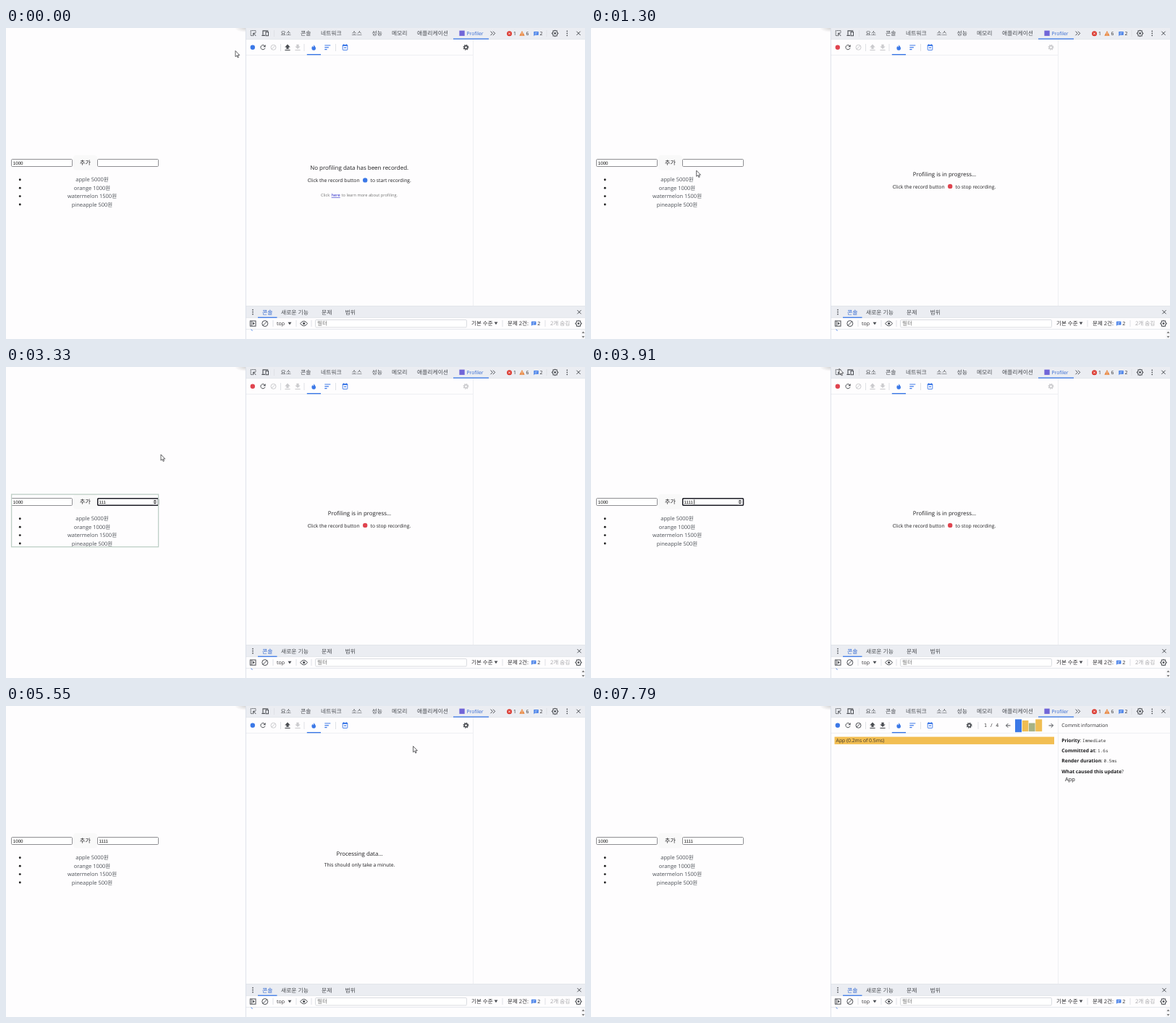
Write an HTML page that moves like this. It is 800 px wide and 430 px high and loops after 7.82 s.

```html
<!DOCTYPE html>
<html lang="ko">
<head>
<meta charset="utf-8">
<title>Profiler recording</title>
<style>
  html, body { margin: 0; width: 100%; height: 100%; overflow: hidden; background: #fefdfe; }
  svg { display: block; width: 800px; height: 430px; font-family: "Open Sans", "Noto Sans CJK KR", "Noto Sans CJK", sans-serif; }
  text { text-rendering: geometricPrecision; }
  .mono { font-family: "Noto Sans Mono", monospace; }
  .field { font-family: "Liberation Sans", sans-serif; }
</style>
</head>
<body>
<svg id="stage" viewBox="0 0 800 430" xmlns="http://www.w3.org/2000/svg"></svg>
<script>
const LOOP = 7820;
const BLUE = '#3b78e7', RED = '#e0444f', DARK = '#4a4d52', PALE = '#cbcbce';
const BAR = '#ebedf2', RULE = '#eeeff3';
const CLICK_START = 700, FOCUS = 1970, CLICK_STOP = 4880, RESULTS = 5690;
const KEYS = [2390, 2560, 2800, 3430];
const HIGHLIGHT_END = 3700;
const HIGHLIGHT_COLORS = ['#a9cfcb', '#b6cec8', '#becfc6', '#c6d0c0'];

const text = (x, y, str, size, fill = '#2b2b2e', attrs = '') =>
  `<text x="${x}" y="${y}" font-size="${size}" fill="${fill}" ${attrs}>${str}</text>`;
const middle = (x, y, str, size, fill = '#1c1c1e') => text(x, y, str, size, fill, 'text-anchor="middle"');
const rect = (x, y, w, h, fill, attrs = '') =>
  `<rect x="${x}" y="${y}" width="${w}" height="${h}" fill="${fill}" ${attrs}/>`;
const line = (d, color, width = 1, attrs = '') =>
  `<path d="${d}" fill="none" stroke="${color}" stroke-width="${width}" ${attrs}/>`;
const fill = (d, color) => `<path d="${d}" fill="${color}"/>`;
const dot = (x, y, r, color, attrs = '') => `<circle cx="${x}" cy="${y}" r="${r}" fill="${color}" ${attrs}/>`;
const group = (id, body) => `<g id="${id}">${body}</g>`;

// Icons
const gear = (x, y, color) =>
  dot(x, y, 2.2, 'none', `stroke="${color}" stroke-width="1.7"`) +
  dot(x, y, 3.4, 'none', `stroke="${color}" stroke-width="1.2" stroke-dasharray="${3.4 * Math.PI / 8}"`);
const hexGear = (x, y) =>
  line(`M${x - 4.2} ${y}l1.4 -1.5l.3 -2.1h2.1l.4 -.5l.4 .5h2.1l.3 2.1l1.4 1.5l-1.4 1.5l-.3 2.1h-2.1l-.4 .5l-.4 -.5h-2.1l-.3 -2.1z`, DARK, 1.1) +
  dot(x, y, 1.4, DARK);
const ban = (x, y, color, r = 3.5) =>
  dot(x, y, r, 'none', `stroke="${color}"`) + line(`M${x - r * .7} ${y + r * .7}l${r * 1.4} ${-r * 1.4}`, color);
const cross = (x, y) => line(`M${x - 2.6} ${y - 2.6}l5.2 5.2m0 -5.2l-5.2 5.2`, DARK, 1);
const kebab = (x, y) => [-3, 0, 3].map(d => dot(x, y + d, .85, DARK)).join('');
const load = (x, up, color) =>
  fill(up ? `M${x} 22.6l3.7 3.9h-2.1v2.4h-3.2v-2.4h-2.1z` : `M${x} 28.9l-3.7-3.5h2.1v-2.6h3.2v2.6h2.1z`, color) +
  rect(x - 3.6, 30, 7.2, 1.1, color);
const bubble = (x, y) => fill(`M${x} ${y}h6.4v4.8h-5l-1.4 1.4z`, BLUE) +
  line(`M${x + 1.2} ${y + 1.6}h4m-4 1.6h2.8`, '#fff', .6);
const separator = (x, y, h) => line(`M${x} ${y}v${h}`, '#dfe1e6', 1);
const arrow = (x, dir, color) => line(`M${x - 3 * dir} 27h${6 * dir}m${-2.8 * dir} -2.8l${2.8 * dir} 2.8l${-2.8 * dir} 2.8`, color, 1);
const inputBox = x => rect(x, 181.5, 84, 10, '#fff', 'rx="1.2" stroke="#8e8e92"');
const fieldText = (str, x, attrs = '') => text(x, 188.8, str, 6.2, '#111', `class="field" ${attrs}`);

function page() {
  const items = ['apple 5000원', 'orange 1000원', 'watermelon 1500원', 'pineapple 500원'];
  return `<defs><radialGradient id="shade"><stop offset="0" stop-color="#999" stop-opacity=".4"/><stop offset="1" stop-color="#999" stop-opacity="0"/></radialGradient></defs>` +
    rect(0, 0, 800, 430, '#fefdfe') +
    `<ellipse cx="331" cy="0" rx="15" ry="6" fill="url(#shade)"/>` +
    rect(93, 176, 33, 20.5, '#f9f9f9', 'rx="4"') + middle(109.4, 189, '추가', 8) +
    inputBox(7.5) + fieldText('1000', 9.8) + inputBox(126.5) +
    group('focus',
      rect(126.7, 181.7, 83.8, 9.6, '#fff', 'rx="1.2" stroke="#1b1b24" stroke-width="1.5"')) +
    group('spinner', rect(202.5, 183, 6.5, 7.2, '#ededef') +
      fill('M203.7 186l2.1-2.3l2.1 2.3zM203.7 187.3l2.1 2.3l2.1-2.3z', '#444')) +
    fieldText('', 128.6, 'id="typed"') +
    rect(0, 183.4, .8, 6.4, '#222', 'id="caret"') +
    items.map((s, i) => dot(19.3, 209.8 + i * 11.4, 1.45, '#222') +
      middle(119, 212.3 + i * 11.4, s, 7.5, '#4c5157')).join('') +
    rect(7.6, 176.1, 203, 72.6, 'none', 'id="highlight" stroke-width="1.3"');
}

function topTabs() {
  const tabs = [[379.5, '요소'], [407, '콘솔'], [435, '네트워크'], [477.5, '소스'], [505.5, '성능'], [533, '메모리'], [568, '애플리케이션']];
  return rect(331, 0, 469, 430, '#fefdfe') + rect(331, 0, 469, 15.5, BAR) +
    line('M331 15.6H800', '#dde1e9', .7) +
    line('M342 10.6h-3.8v-7h6.8v3', DARK, 1, 'stroke-dasharray="1.4 .7"') +
    line('M345.3 11l-3.6-3.8m0 3v-3h3', DARK, 1) +
    line('M355 9.5v-5.6h7.3M353.4 10.4h4.5', DARK, 1.1) + rect(359, 5.5, 3.5, 5.2, 'none', `stroke="${DARK}"`) +
    separator(370.5, 3, 9) +
    tabs.map(([x, s]) => text(x, 9.9, s, 7.8, '#484b50')).join('') +
    rect(626.4, 3.6, 7.3, 7.3, '#7065d8') +
    text(636.5, 9.7, 'Profiler', 6.75, '#2f66d0') + rect(618, 14.4, 49, 1.3, BLUE) +
    line('M669.5 4.6l2.8 2.8l-2.8 2.8m3.4-5.6l2.8 2.8l-2.8 2.8', DARK) +
    dot(695.5, 7.7, 3.5, '#dc3b32') + line('M694.2 6.4l2.6 2.6m0-2.6l-2.6 2.6', '#fff', .8) +
    text(701, 10.2, '1', 6.8) +
    fill('M713 3.9l3.7 6.8h-7.4z', '#e8833a') + line('M713 6.2v2.3m0 .6v.8', '#fff', .8) +
    text(718.5, 10.2, '6', 6.8) + bubble(729.3, 5) + text(737.5, 10.2, '2', 6.8) +
    separator(747, 3, 9) + hexGear(758.6, 7.4) + kebab(775.3, 7.3) + cross(791, 7.3);
}

function toolbar() {
  return line('M331 37.5H645.5M645.5 16V384', RULE) +
    dot(340.8, 26.8, 3.2, BLUE, 'id="record"') +
    line('M357.3 24.6a3.1 3.1 0 1 0 .7 3', DARK, 1) + fill('M358.6 23v3.2h-3.2z', DARK) +
    separator(379.5, 22, 10) + separator(412, 22, 10) + separator(455.5, 22, 10) +
    fill('M425.3 22.9c.2 1.5 2.7 2.6 2.7 5a2.8 2.8 0 0 1-5.6 0c0-1.4.7-2.2 1.2-2.8l.7 1.3c.8-.9 1.1-2.1 1-3.5z', BLUE) +
    rect(415.8, 36, 19.2, 1.4, BLUE) +
    line('M440.3 24h8m-8 2.8h5.6m-5.6 2.8h3.2', BLUE, 1.2) +
    rect(465.2, 23.6, 6.6, 6.9, 'none', `stroke="${BLUE}" stroke-width=".9" rx=".6"`) + rect(465, 23.2, 7, 1.8, BLUE) +
    line('M466.7 22v2m3.6-2v2', BLUE, .8) + rect(466.9, 26.7, 3.2, 1.2, BLUE) +
    group('upOn', load(389, true, DARK)) + group('upOff', load(389, true, PALE)) +
    group('downOff', load(403, false, PALE) + ban(369.5, 26.8, PALE)) +
    group('gearOn', gear(635.5, 26.8, DARK)) + group('gearOff', gear(635.5, 26.8, PALE));
}

function panels() {
  const bold = s => `<tspan font-weight="700" fill="#1c1c1e">${s}</tspan>`;
  const fact = (y, label, value) =>
    text(650.3, y, `${bold(label)}: <tspan class="mono" font-size="6" fill="#333">${value}</tspan>`, 6.7);
  const bars = [[586, 18.4, 9, BLUE], [595.8, 20, 8.6, '#f0bd52'], [605, 23.6, 8.6, '#a6b285'], [614.2, 18.4, 9, '#f0bd52']];
  return group('idle', middle(488.2, 196.3, 'No profiling data has been recorded.', 7.97) +
      text(416.8, 213, 'Click the record button', 6.75, '#1c1c1e') + dot(496.2, 210.4, 3.2, BLUE) +
      text(503.6, 213, 'to start recording.', 6.75, '#1c1c1e') +
      text(435, 233.2, 'Click', 5.7, '#777') +
      text(449.6, 233.2, 'here', 5.7, '#2424c8', 'text-decoration="underline"') +
      text(463.6, 233.2, 'to learn more about profiling.', 5.65, '#777')) +
    group('recording', middle(488.5, 205, 'Profiling is in progress...', 7.9) +
      text(416.8, 221.5, 'Click the record button', 6.75, '#1c1c1e') + dot(496.2, 218.9, 3.2, RED) +
      text(503.6, 221.5, 'to stop recording.', 6.75, '#1c1c1e')) +
    group('processing', middle(488.5, 207.2, 'Processing data...', 7.9) +
      middle(488.5, 221.5, 'This should only take a minute.', 6.75)) +
    group('results', ban(369.5, 26.8, DARK) + load(403, false, DARK) +
      line('M645.5 37.5H800', RULE) + gear(522.6, 26.8, DARK) + separator(535, 22, 10) +
      text(543, 29.2, '1 / 4', 6.8, '#333', 'class="mono"') +
      arrow(576.5, -1, DARK) + arrow(635.5, 1, DARK) +
      bars.map(([x, y, w, c]) => rect(x, y, w, (c === BLUE ? 36.2 : 35.2) - y, c)).join('') +
      rect(336.5, 42.6, 303.5, 10.3, '#f2be52') + text(338.6, 50.3, 'App (0.2ms of 0.5ms)', 6.8, '#3a3428') +
      text(650.3, 29.4, 'Commit information', 6.75) +
      fact(50, 'Priority', 'Immediate') + fact(64.2, 'Committed at', '1.6s') + fact(78.4, 'Render duration', '0.5ms') +
      text(650.3, 92.7, bold('What caused this update') + '?', 6.7) + text(655, 104, 'App', 7.5, '#1c1c1e'));
}

function consoleDrawer() {
  const tabs = [[354, '콘솔', '#2f66d0'], [380, '새로운 기능'], [436, '문제'], [468.5, '범위']];
  return rect(331, 384.5, 469, 16, BAR) + line('M331 384.5H800M331 400.6H800M331 416.6H800', '#dfe2e9', .8) +
    kebab(341, 392.7) + tabs.map(([x, s, c = '#484b50']) => text(x, 395.5, s, 7.8, c)).join('') +
    rect(348, 399.6, 26.5, 1.3, BLUE) + cross(792, 392.7) +
    rect(337.4, 405, 7.6, 7.2, 'none', `stroke="${DARK}"`) + line('M339.6 405v7', DARK, .9) +
    fill('M341 406.6l2.8 2l-2.8 2z', DARK) + ban(357.8, 408.6, DARK, 4) + separator(369, 404, 9) +
    text(374, 411, 'top', 7) + fill('M389.6 406.8h4.8l-2.4 3.6z', DARK) + separator(401, 404, 9) +
    line('M406.6 408.6q5-6.6 10 0q-5 6.6-10 0z', DARK) + dot(411.6, 408.6, 1.6, DARK) +
    separator(422, 404, 9) +
    rect(427.5, 403.5, 209, 10.4, '#fff', 'rx="1.5" stroke="#d6d8de" stroke-width=".9"') +
    text(430, 411.4, '필터', 7.6, '#777') +
    text(643, 411.3, '기본 수준', 7.5) + fill('M674.6 406.6h4.8l-2.4 3.6z', DARK) + separator(686, 404, 9) +
    text(693, 411.3, '문제 2건:', 7.5) + bubble(726, 405.8) + text(734.2, 411.3, '2', 7) +
    separator(745, 404, 9) + text(752, 411.3, '2개 숨김', 7.6, '#a5a5a8') + hexGear(791, 408.6) +
    line('M338.5 417l2.2 1.4', BLUE, .9) +
    rect(794.5, 417, 5.5, 13, '#f6f6f8') + fill('M795.6 422l1.9-2.4l1.9 2.4zM795.6 426l1.9 2.4l1.9-2.4z', '#777') +
    line('M331.4 0V430', '#dadfe8', .9);
}

const pointer = group('pointer', `<path id="arrow" d="M0 0V8.2L1.9 6.5L3.2 9.5L4.5 8.9L3.2 6.1H5.8Z" fill="#fff" stroke="#3a3a3e" stroke-width=".8"/>` +
  line('M-1.5 -4h3M0 -4v8M-1.5 4h3', '#333', .8, 'id="beam"'));

const stage = document.getElementById('stage');
stage.innerHTML = page() + topTabs() + toolbar() + panels() + consoleDrawer() + pointer;

const $ = id => document.getElementById(id);
const show = (id, on) => $(id).setAttribute('visibility', on ? 'visible' : 'hidden');

// Pointer path: time, x, y
const PATH = [[30, 317, 31.5], [140, 321, 34], [360, 340, 27], [970, 340, 27], [1300, 145.7, 197], [1610, 152, 187],
  [2360, 152, 187], [2610, 162.7, 174.7], [3000, 214, 121], [3330, 214, 121], [3750, 354, 8], [3910, 343, 2.3],
  [4090, 338, 27], [4390, 339, 27], [5360, 339, 27], [5550, 562.6, 55.6], [RESULTS, 602, 45]];

function pointerAt(t) {
  const next = PATH.findIndex(p => p[0] > t);
  if (next === 0) return PATH[0].slice(1);
  if (next < 0) return PATH[PATH.length - 1].slice(1);
  const [t0, x0, y0] = PATH[next - 1], [t1, x1, y1] = PATH[next];
  const u = (t - t0) / (t1 - t0), k = u * u * (3 - 2 * u);
  return [x0 + (x1 - x0) * k, y0 + (y1 - y0) * k];
}

function render(t) {
  const idle = t < CLICK_START, done = t >= RESULTS;
  const recording = !idle && t < CLICK_STOP;
  const focused = t >= FOCUS && t < CLICK_STOP;
  const count = KEYS.filter(k => t >= k).length;
  const [x, y] = pointerAt(t);
  const overInput = x > 127 && x < 211 && y > 182 && y < 192;

  show('idle', idle);
  show('recording', recording);
  show('processing', t >= CLICK_STOP && !done);
  show('results', done);
  $('record').setAttribute('fill', recording ? RED : BLUE);
  show('upOn', !recording);
  show('upOff', recording);
  show('downOff', !done);
  show('gearOn', !recording && !done);
  show('gearOff', recording);

  show('focus', focused);
  show('spinner', focused || overInput);
  $('typed').textContent = '1'.repeat(count);
  const lastKey = count ? KEYS[count - 1] : FOCUS;
  show('caret', focused && (t - lastKey) % 950 < 490);
  $('caret').setAttribute('x', 128.8 + count * 3.3);
  show('highlight', count && t < HIGHLIGHT_END);
  $('highlight').setAttribute('stroke', HIGHLIGHT_COLORS[Math.max(0, count - 1)]);

  $('pointer').setAttribute('transform', `translate(${x.toFixed(2)} ${y.toFixed(2)})`);
  show('arrow', !done && !overInput);
  show('beam', !done && overInput);
}

let start;
function tick(now) {
  start ??= now;
  render((now - start) % LOOP);
  requestAnimationFrame(tick);
}
render(0);
requestAnimationFrame(tick);
</script>
</body>
</html>
```
